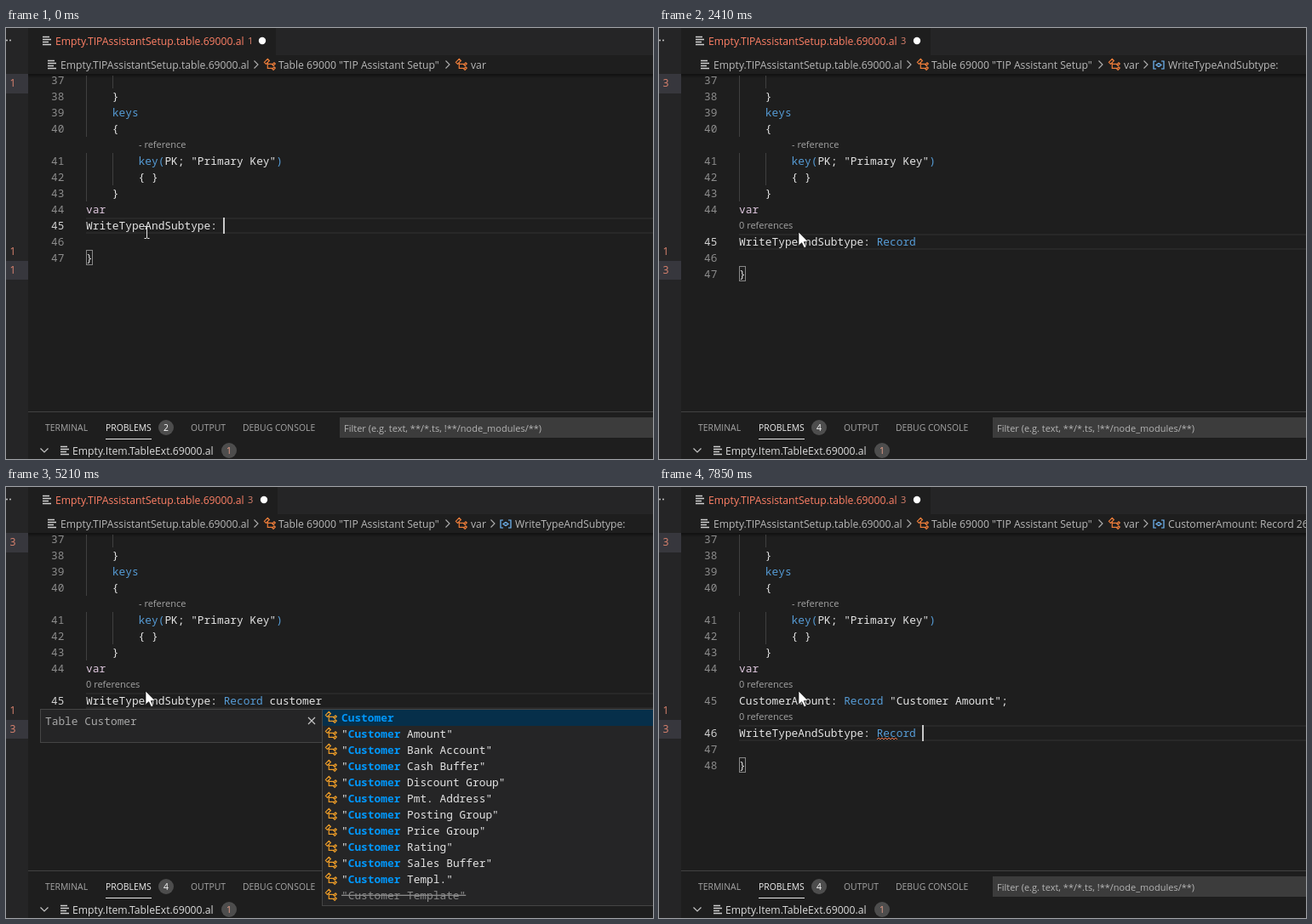
Animation of 760 by 507 pixels, one loop 8000 ms. Source, as an HTML page:

```html
<!DOCTYPE html>
<html lang="en">
<head>
<meta charset="utf-8">
<title>Editor autocomplete</title>
<style>
html, body { margin: 0; height: 100%; overflow: hidden; background: #1e1e1e; }
svg { display: block; width: 100%; height: 100%; }
text { white-space: pre; font: 12.2px "Open Sans", "Noto Sans", sans-serif; }
.mono { font: 12.83px "Noto Sans Mono", "DejaVu Sans Mono", monospace; }
.lens { font-size: 11px; }
.tab { font-size: 10.4px; }
.heavy .mono { font-weight: 500; }
.hit { fill: #0097fb; font-weight: bold; }
</style>
</head>
<body>
<svg id="stage" viewBox="0 0 760 507"></svg>
<script>
const stage = document.getElementById('stage');
const CHAR = 7.7, ROW = 19, LEFT = 94, LOOP = 8000;
const PROMPT = 'WriteTypeAndSubtype: ';
const FILE = 'Empty.TIPAssistantSetup.table.69000.al';
const SNIPPET = 'tGetRecordOncenirbo';

const types = ['Record', 'RecordId', 'RecordRef', SNIPPET, 'WebServiceActionResultCode',
  'Report', 'ReportFormat', 'RequestPage', 'FieldRef', 'KeyRef', 'HttpRequestMessage', 'TestRequestPage'];
const tables = ['Custom Address Format', 'Custom Address Format Line', 'Custom Report Layout',
  'Custom Report Selection', 'Customer', 'Customer Amount', 'Customer Bank Account',
  'Customer Cash Buffer', 'Customer Discount Group', 'Customer Pmt. Address',
  'Customer Posting Group', 'Customer Price Group', 'Customer Rating',
  'Customer Sales Buffer', 'Customer Templ.', 'Customer Template']
  .map(name => /[ .]/.test(name) ? `"${name}"` : name);

// Each step changes part of the state and keeps the rest.
const steps = [
  [0, { typed: '', caret: 1, errors: 1, popup: 0, pick: 0, lens: null, keyLens: '- reference',
        arrow: 0, crumb: '', done: 0, squiggle: 0 }],
  [200, { typed: 'r' }],
  [400, { popup: 1 }],
  [590, { errors: 3, lens: '', crumb: 'WriteTypeAndSubtype:' }],
  [790, { typed: 're' }],
  [990, { typed: 'rec' }],
  [1190, { typed: 'reco' }],
  [1590, { typed: 'recor' }],
  [1790, { typed: 'record' }],
  [1990, { lens: '0 references', arrow: 1 }],
  [2410, { typed: 'Record ', popup: 0, caret: 0 }],
  [3010, { caret: 1 }],
  [3410, { typed: 'Record c' }],
  [3810, { typed: 'Record cus', popup: 1, lens: 'no commands', keyLens: 'no commands' }],
  [4010, { typed: 'Record cust' }],
  [4210, { typed: 'Record custo' }],
  [4410, { typed: 'Record custom' }],
  [4610, { typed: 'Record custome' }],
  [4810, { typed: 'Record customer' }],
  [5020, { lens: '0 references', keyLens: '- reference', caret: 0 }],
  [5420, { pick: 1 }],
  [5630, { typed: 'Record "Customer Amount"', popup: 0, pick: 0 }],
  [5830, { typed: '', done: 1, lens: null }],
  [6230, { errors: 1, crumb: 'CustomerAmount: Record 260' }],
  [6650, { caret: 1 }],
  [6850, { typed: 'rec', popup: 1 }],
  [7050, { typed: 'record', errors: 3, lens: '0 references' }],
  [7450, { typed: 'Record ', popup: 0 }],
  [7650, { caret: 0 }],
  [7850, { caret: 1, squiggle: 1 }]
];
let last = {};
const states = steps.map(([at, change]) => last = { ...last, ...change, at });

const rect = (x, y, w, h, fill, more = '') =>
  `<rect x="${x}" y="${y}" width="${w}" height="${h}" fill="${fill}" ${more}/>`;
const text = (x, y, s, fill, cls = '', more = '') =>
  `<text x="${x}" y="${y}" fill="${fill}" class="${cls}" ${more}>${s}</text>`;
const line = (x, y, d, color, width = 1) =>
  `<path transform="translate(${x} ${y})" d="${d}" fill="none" stroke="${color}" stroke-width="${width}"/>`;
const circle = (x, y, r, fill) => `<circle cx="${x}" cy="${y}" r="${r}" fill="${fill}"/>`;
const mono = (x, y, s, fill = '#e4e4e4', more = '') => text(x, y + 5, s, fill, 'mono', more);

const fileIcon = (x, y) => line(x, y, 'M0 .5h8M0 3.5h10M0 6.5h7M0 9.5h10', '#d0d0d0', 1.3);
const classIcon = (x, y, color) =>
  line(x, y, 'M1.4 5.3l3.9-3.9 2.1 2.1-3.9 3.9zM5.3 5.7v6.6h5.5M5.3 7.3h5.5' +
    'M10.8 8l2.2-2.2 1.3 1.3-2.2 2.2zM10.8 13l2.2-2.2 1.3 1.3-2.2 2.2z', color, 1.2);
const fieldIcon = (x, y) =>
  line(x, y, 'M4 1h-3v9h3M10 1h3v9h-3M4 5.5l3-2 3 2-3 2z', '#75beff', 1.2);
const typeIcon = (x, y) =>
  line(x, y, 'M0 1.5h8M10 1.5h4M0 4.5h3v2h-3M5 5.5h9M0 9.5h5M7 9.5h7M0 12h9', '#c5c5c5', 1.1);
const snippetIcon = (x, y) =>
  line(x, y, 'M1.5 12v-10.5h11v10.5M1 12h2.5M5 12h1.5M8 12h1.5M11 12h2', '#c5c5c5', 1.2);
const chevron = (x, y) => line(x, y, 'M-2.5-4.5l4.5 4.5-4.5 4.5', '#b0b0b0', 1.1);
const badge = (x, y, n, color) => circle(x, y, 9, '#4d4d4d') +
  text(x, y + 4, n, color, 'tab', 'text-anchor="middle"');

const colored = s => s.replace(/\b(?:Record|keys|key)\b|[()]/g, '<tspan fill="#569cd6">$&</tspan>')
  .replace(/^var$/, '<tspan fill="#dfc8df">var</tspan>');

// Positions of the letters matching the typed word, or null.
function hits(name, word) {
  name = name.toLowerCase();
  const at = name.indexOf(word);
  if (at >= 0) return [...word].map((_, i) => at + i);
  const found = [];
  let p = name.length;
  for (const c of [...word].reverse()) {
    p = name.lastIndexOf(c, p - 1);
    if (p < 0) return null;
    found.unshift(p);
  }
  return p + 8 > found[found.length - 1] ? found : null;
}

function frame({ errors, crumb }) {
  const red = '#ff8066', dim = '#e08570', grey = '#b8b8b8', orange = '#ee7d3a';
  const wide = errors > 1 ? 2 : 0;
  const count = (y, n) => text(11.5, y + 4, n, dim, '', 'text-anchor="end"');
  let out = rect(0, 0, 760, 507, '#1e1e1e') + rect(0, 0, 760, 32, '#252526') +
    rect(0, 0, 26, 507, '#252526') + rect(26, 0, 291 + wide, 32, '#1e1e1e') +
    rect(0, 54, 26, 23, '#37373d') + rect(0, 274, 26, 22, '#37373d') +
    circle(1, 14.5, 1, '#c5c5c5') + circle(5, 14.5, 1, '#c5c5c5') +
    count(65, errors) + count(263, 1) + count(285, errors) +
    fileIcon(43, 10) + text(58, 20, FILE, red) + text(284, 19, errors, dim, 'lens') +
    circle(301 + wide, 15, 4.2, '#fff') +
    fileIcon(49, 38) + text(64, 48, FILE, grey) + chevron(294, 43) +
    classIcon(302, 35, orange) + text(320, 48, 'Table 69000 "TIP Assistant Setup"', grey) +
    chevron(519, 43) + classIcon(527, 35, orange) + text(546, 48, 'var', grey);
  if (crumb) out += chevron(572, 43) + fieldIcon(580, 38) + text(598, 48, crumb, grey);
  return out + rect(26, 54, 734, 2, '#131313') + rect(26, 56, 734, 2, '#191919');
}

function panel({ errors }) {
  const grey = '#a6a6a6';
  return rect(26, 451, 734, 1, '#414141') + text(46, 474, 'TERMINAL', grey, 'tab') +
    text(117, 474, 'PROBLEMS', '#f0f0f0', 'tab') + rect(117, 483, 54, 1, '#e7e7e7') +
    badge(188, 470, errors + 1, '#fff') + text(217, 474, 'OUTPUT', grey, 'tab') +
    text(278, 474, 'DEBUG CONSOLE', grey, 'tab') + rect(392, 458, 368, 24, '#3c3c3c') +
    text(397, 475, 'Filter (e.g. text, **/*.ts, !**/node_modules/**)', '#b4b4b4', 'lens') +
    line(45, 497, 'M-4.5-2.5l4.5 4.5 4.5-4.5', '#c5c5c5', 1.2) +
    fileIcon(64, 492) + text(78, 502, 'Empty.Item.TableExt.69000.al', '#dcdcdc') +
    badge(262, 497, 1, '#f5a890');
}

function popup(state, x, y) {
  const word = state.typed.split(' ').pop();
  const isTable = state.typed.includes(' ');
  const names = (isTable ? tables : types).filter(name => hits(name, word)).slice(0, 12);
  const width = isTable ? 440 : 432;
  const box = 'stroke="#454545"';
  let out = rect(x + .5, y + .5, width - 1, names.length * ROW + 3, '#252526', box);
  if (isTable) {
    out += rect(x - 330.5, y + .5, 331, 39, '#252526', box) +
      mono(x - 325, y + 14, 'Table ' + names[state.pick], '#a8a8a8') +
      line(x - 12, y + 14, 'M-4-4l8 8M4-4l-8 8', '#c5c5c5', 1.2);
  }
  names.forEach((name, i) => {
    const mid = y + 10 + i * ROW;
    if (i === state.pick) out += rect(x + 1, mid - 9, width - 2, ROW, '#062f4a');
    out += isTable ? classIcon(x + 3, mid - 8, '#ee9d28')
      : (name === SNIPPET ? snippetIcon : typeIcon)(x + 4, mid - 6);
    if (name === '"Customer Template"') {
      out += mono(x + 23, mid, name, '#8a8a8a', 'text-decoration="line-through"');
      return;
    }
    const marks = hits(name, word);
    const label = [...name].map((c, j) => marks.includes(j) ? `<tspan class="hit">${c}</tspan>` : c).join('');
    out += mono(x + 23, mid, label);
    if (name === SNIPPET) out += mono(x + 421, mid, 'Get Record Once', '#9a9a9a', 'text-anchor="end"');
  });
  return isTable ? `<g class="heavy">${out}</g>` : out;
}

function editor(state) {
  const typing = PROMPT + state.typed;
  const rows = ['', '    }', '    keys', '    {', { lens: state.keyLens, x: 156 },
    '        key(PK; "Primary Key")', '        { }', '    }', 'var'];
  if (state.done) rows.push({ lens: '0 references', x: LEFT }, 'CustomerAmount: Record "Customer Amount";');
  if (state.lens !== null) rows.push({ lens: state.lens, x: LEFT });
  rows.push(typing, '', '}');

  let out = line(0, 0, 'M94.5 56V128M94.5 147V204M125.5 56V71M125.5 147V185', '#404040');
  let number = 37, y = 61, active;
  for (const row of rows) {
    if (row.lens !== undefined) {
      out += text(row.x, y + 4, row.lens, '#a4a4a4', 'lens');
    } else {
      const current = row === typing;
      if (current) {
        active = y;
        out += rect(LEFT, y - 9, 666, 2, '#282828') + rect(LEFT, y + 8, 666, 2, '#282828');
      }
      if (row === '}') out += rect(94.5, y - 8.5, 7, 17, 'none', 'stroke="#888"');
      out += mono(68.5, y, number++, current ? '#d0d0d0' : '#8c8c8c', 'text-anchor="end"') +
        mono(LEFT, y, colored(row));
    }
    y += ROW;
  }
  const x = Math.round(LEFT + typing.length * CHAR);
  if (state.squiggle) out += line(256, active + 7, 'M0 1' + 'l2-2 2 2'.repeat(6), '#f4774f');
  if (state.caret) out += rect(x - 1, active - 9, 2, ROW, '#c8c8c8');
  return out + panel(state) + (state.popup ? popup(state, x, active + 10) : '');
}

const pointer = ({ arrow }) => arrow
  ? '<path transform="translate(164 240)" d="M0 0v16l3.7-3.4 2.8 6 2.6-1.2-2.8-5.8h5z" fill="#fff" stroke="#000" stroke-width=".6"/>'
  : line(165.5, 240, 'M-3-6.5h2.2l.8.8.8-.8h2.2M0-6v13M-3 7.5h2.2l.8-.8.8.8h2.2', '#e8e8e8');

let shown;
function draw(now) {
  const t = now % LOOP;
  const state = states.filter(s => s.at <= t).pop();
  if (state !== shown) {
    shown = state;
    stage.innerHTML = frame(state) + editor(state) + pointer(state);
  }
  requestAnimationFrame(draw);
}
draw(0);
</script>
</body>
</html>
```
